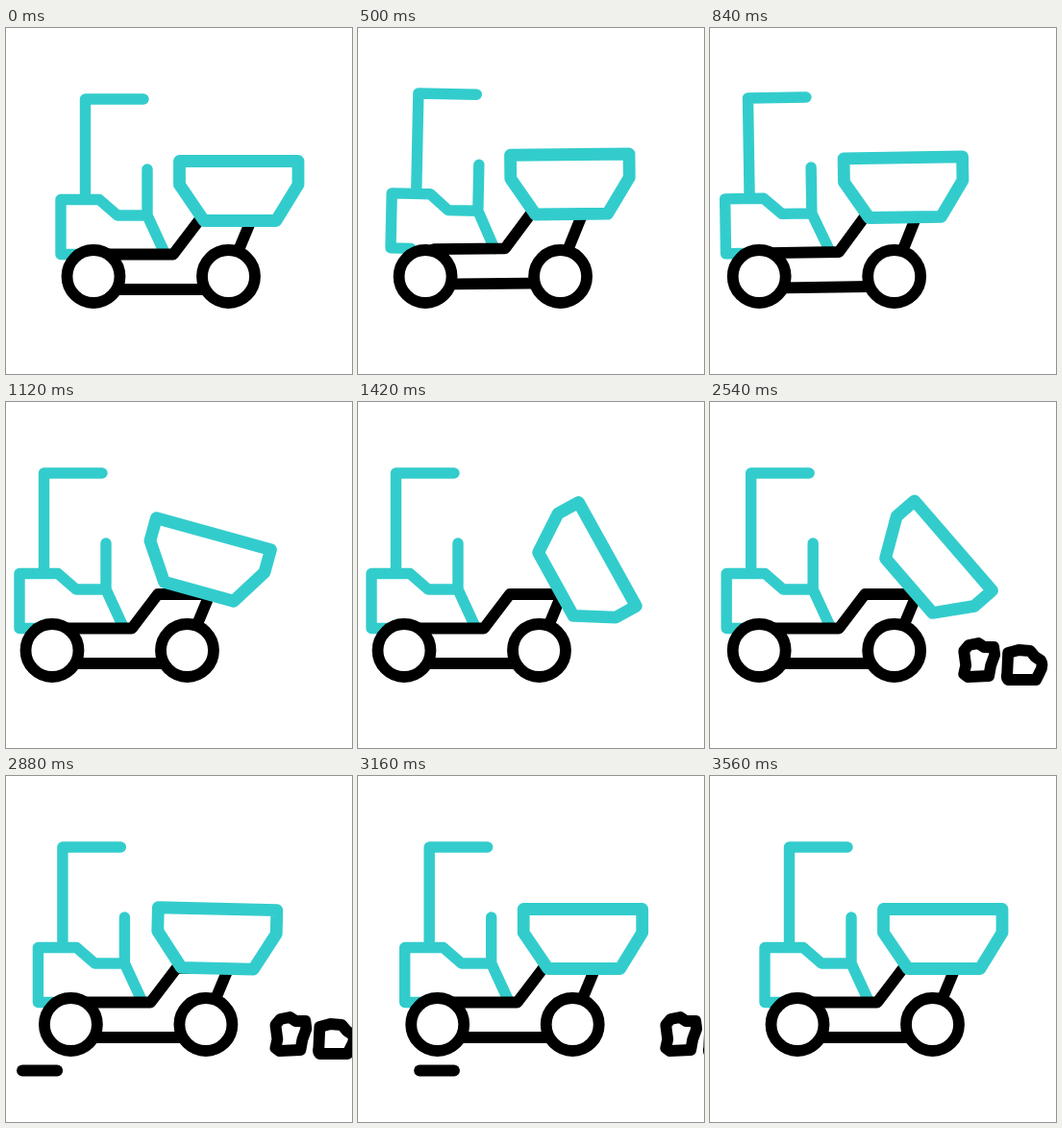
An HTML page that plays this animation: 360x360 px, repeating every 3.6 s.

```html
<!DOCTYPE html>
<html lang="en">
<head>
<meta charset="utf-8">
<title>Dump truck</title>
<style>
  html, body { margin: 0; width: 100%; height: 100%; overflow: hidden; background: #fff; }
  svg { display: block; width: 100%; height: 100%; fill: none; stroke: #000; stroke-width: 11.8; stroke-linecap: round; stroke-linejoin: round; }
  .teal { stroke: #33cccc; }
  .solid { fill: #fff; }
  #cabin { stroke-width: 11.4; }
  #bucket { stroke-width: 12.8; }
</style>
</head>
<body>
<svg viewBox="0 0 360 360">
  <defs>
    <path id="stoneA" d="M-17-13L-6-16 6-15 11-9 17-5Q20 0 16 7L12 15-17 15Q-19 13-18 9Z"/>
    <path id="stoneB" d="M-16-10L-11-16-1-18 5-14 15-14 16-6 12 5 10 16-12 17-16 14-14 5Z"/>
  </defs>
  <path id="dash"/>
  <g id="truck">
    <g class="solid">
      <use class="stone" href="#stoneA"/>
      <use class="stone" href="#stoneB"/>
      <use class="stone" href="#stoneA"/>
    </g>
    <g id="cabin" class="teal">
      <path d="M143 74H82.5V178M147 147V195H116L97 178.5H57V235.5H78M147 195L165 234"/>
    </g>
    <g id="chassis">
      <path d="M100 235.5H174L201 200H255L240 236M100 272H222"/>
    </g>
    <g class="solid">
      <circle cx="91" cy="258.5" r="27.5"/>
      <circle cx="231.5" cy="258.5" r="27.5"/>
    </g>
    <g id="body">
      <path id="bucket" class="teal solid" d="M180.5 138.5H304V163L281 200.5H206L180.5 163Z"/>
    </g>
  </g>
</svg>
<script>
  const LOOP = 3600;
  const $ = id => document.getElementById(id);
  const stones = document.querySelectorAll('.stone');

  const falls = [
    { start: 1600, time: 470, x: 367, y: 274, drag: 1 },
    { start: 1860, time: 520, x: 320, y: 269, drag: 5 },
    { start: 1800, time: 560, x: 425, y: 274, drag: 1 }
  ];

  const progress = (t, a, b) => Math.min(1, Math.max(0, (t - a) / (b - a)));
  const ease = p => (1 - Math.cos(Math.PI * p)) / 2;
  const between = (t, a, b) => ease(progress(t, a, b));

  // Eased value through [time, value] pairs
  function keyed(t, keys) {
    return keys.slice(1).reduce((value, [time, next], i) =>
      value + (next - keys[i][1]) * between(t, keys[i][0], time), keys[0][1]);
  }

  function place(id, dx, dy, angle) {
    $(id).setAttribute('transform', `translate(${dx} ${dy}) rotate(${angle} 110 240)`);
  }

  function draw(t) {
    const shift = -43 * (between(t, 0, 1020) - between(t, 2338, 3496));
    const bounce = Math.sin(Math.PI * progress(t, 0, 1020)) ** 2;
    const lean = keyed(t, [[0, 0], [500, -0.6], [840, -0.9], [1040, 0]]);
    const sway = keyed(t, [[0, 0], [500, 1.2], [840, -0.9], [1040, 0]]);
    const tilt = 61 * (between(t, 980, 1400) - between(t, 2380, 2934));

    $('truck').setAttribute('transform', `translate(${shift} 0)`);
    place('chassis', 0, -5.5 * bounce, lean);
    place('body', 0, -5.5 * bounce, lean);
    place('cabin', -2.2 * bounce, -5.5 * bounce, sway);
    $('bucket').setAttribute('transform', `rotate(${tilt} 255.5 199.5)`);

    const slide = 90 * progress(t, 2900, 3400) ** 2;
    falls.forEach(({ start, time, x, y, drag }, i) => {
      const u = progress(t, start, start + time);
      const px = 280 + (x - 280) * (1 - (1 - u) ** drag) + slide;
      const py = 168 + (y - 168) * u * u;
      stones[i].setAttribute('transform', `translate(${px} ${py}) rotate(${40 * (u - 1)})`);
      stones[i].style.display = t > start && t < 3400 ? '' : 'none';
    });

    const tail = 17 + 83 * progress(t, 2900, 3360);
    const head = 17 + 83 * progress(t, 2720, 3089);
    $('dash').setAttribute('d', t > 2720 && t < 3360 ? `M${tail} 306.5H${head}` : '');
  }

  function tick() {
    draw(performance.now() % LOOP);
    requestAnimationFrame(tick);
  }
  tick();
</script>
</body>
</html>
```
